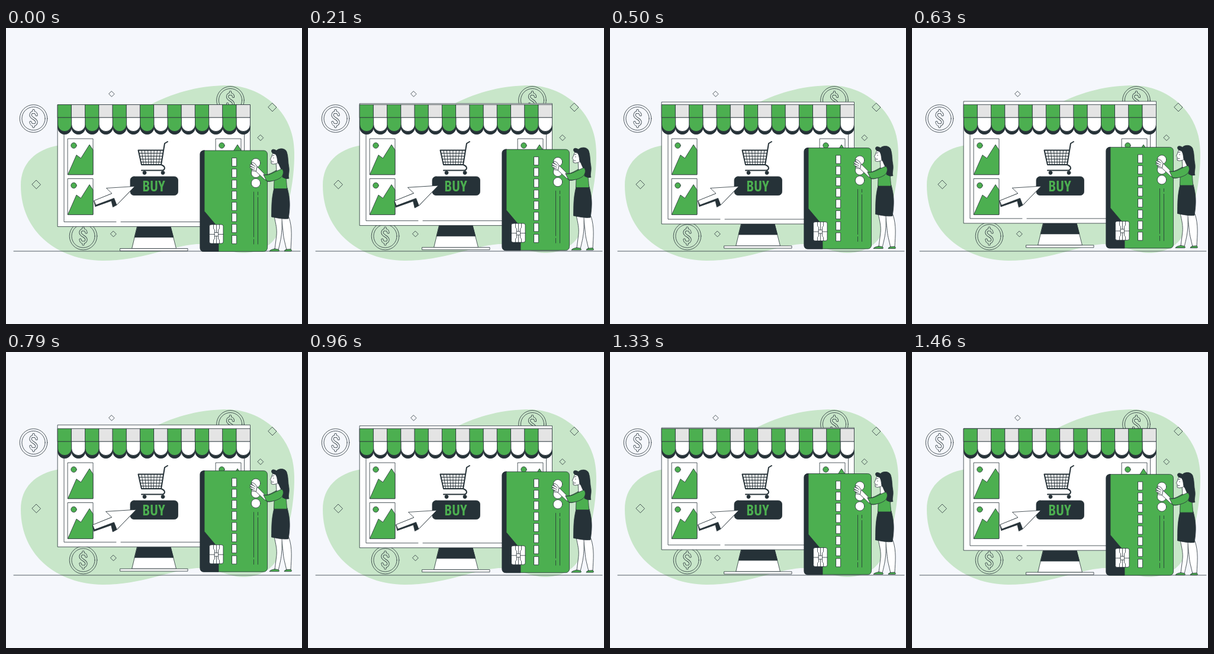
Recreate the animation shown at these times as an HTML page. Size 500x500 px, loop 1500 ms.

```html
<!DOCTYPE html>
<html lang="en">
<head>
<meta charset="utf-8">
<title>Buy online</title>
<style>
  html, body { margin: 0; height: 100%; overflow: hidden; background: #f5f7fc; }
  svg { display: block; width: 100vw; height: 100vh; stroke: #263238; stroke-width: .8; stroke-linejoin: round; stroke-linecap: round; fill: none; }
  .white { fill: #fff; }
  .green { fill: #4caf50; }
  .grey { fill: #e4e4e4; }
  .dark { fill: #263238; }
  .blob { fill: #c8e6c9; stroke: none; }
  text { font: bold 25px "Open Sans Condensed", "Roboto Condensed", "Open Sans", sans-serif; font-stretch: 75%; text-anchor: middle; fill: #4caf50; stroke: none; }
</style>
</head>
<body>
<svg viewBox="0 0 500 500">
  <path class="blob" d="M25 266C25 228 50 205 90 198C160 187 190 158 245 129C290 106 332 97 375 97C430 98 487 140 487 210C488 260 474 318 460 346C449 370 425 380 400 380C372 379 352 364 322 365C275 369 230 393 163 393C88 392 25 345 25 266Z"/>
  <g id="diamonds"></g>
  <g id="coins"></g>
  <path d="M13 377H497"/>

  <g class="float">
    <path class="white" d="M222 335.5H278L287.5 372.5H213Z"/>
    <path class="dark" d="M222 335.5H278L282.8 353.5H217.4Z"/>
    <path class="white" d="M193 372.5H307V376.5H193ZM87.5 129.5H412.5V335.5H87.5Z"/>
    <path d="M98 150V327.5H186M194 327.5H402.5V150"/>
  </g>

  <g id="pictures"></g>
  <g id="awning"></g>

  <g id="cart">
    <path stroke-width="2" d="M273 192L268 195L262 231H229L223.5 206.5H266M262 231C265 232 268 234 268 237Q267 240.500 264 240.500H229"/>
    <path id="mesh" stroke-width="1"/>
    <circle class="dark" cx="234" cy="244.500" r="3"/>
    <circle class="dark" cx="265" cy="244.500" r="3"/>
  </g>

  <rect class="dark" x="210" y="251" width="80.500" height="31.500" rx="6"/>
  <text x="249.500" y="276">BUY</text>

  <g id="cursor">
    <path class="dark" d="M149 292L179 279.500L217.500 267.500L187 299L180.500 302.500L178 292L151 301.500Z"/>
    <path class="white" d="M149 291.500L179 279.500L169.500 270.500L217.500 267.500L187 299L182.500 287.500L152 299Z"/>
  </g>

  <g class="float">
    <rect class="green" x="328" y="207" width="113.500" height="170.500" rx="6"/>
    <path class="dark" d="M335 207V309.500L359 338V377.500H334Q328 377.500 328 371.500V213Q328 207 335 207Z"/>
    <g id="dashes" class="white"></g>
    <rect class="white" x="343.500" y="332" width="23.500" height="32" rx="3"/>
    <path d="M352.500 345.500H358.500V351.500H352.500ZM343.500 348.500H352.500M358.500 348.500H367M355.500 332V345.500M355.500 351.500V364M350.500 332V339L352.500 341V345.500M360.500 332V339L358.500 341V345.500M350.500 364V358L352.500 356V351.500M360.500 364V358L358.500 356V351.500"/>
    <g id="dots" class="white"></g>
    <path d="M418.500 277V353M418.500 357V365M425.500 277V282M425.500 286V365"/>

    <g id="woman">
      <path class="white" d="M465 320C468 338 468 350 470 358L474 375L481 374C482 355 484 338 478 320Z"/>
      <path class="white" d="M453 318C456 332 458 340 457 350L454 374L460 375C464 358 467 348 466 321Z"/>
      <path class="green" d="M454 373L460 374Q463 377 460 377H445Q446 374.500 454 373ZM474 374L481 373.500Q484 377 481 377H470Q470 375 474 374Z"/>
      <path class="dark" d="M453 270H475C479 285 481 298 477 322C468 323 458 321 448.500 319C449 302 448 290 453 270Z"/>
      <path class="white" d="M456 226L457 241Q462 244 467 239L465 222Z"/>
      <path class="green" d="M456 241Q462 245 468 238C474 241 473 260 475 271.500H452.500L453 257C446 260 442 260 440 258L434 248C444 249 449 244 456 241Z"/>
      <path class="white" d="M424 234L436 246Q439 249 440 257L437 256L422 242Z"/>
      <path class="white" d="M424 234Q421 228 417 227Q414 226 415 229L418 232L413 230Q411 231 413 233L416 235L412 234Q411 236 414 237L417 239L414 239Q415 242 422 242Z"/>
      <path d="M418 232L421 234M416 235L420 237M417 239L420 240M435 247Q440 252 440 258"/>
      <path class="white" d="M452 210C449 214 449 217 446.500 222L448 223.500L448 229Q451 231 457 229L464 223V210Z"/>
      <path class="dark" d="M457 207C460 203 471 202 474 209C477 217 476 226 478 236C479 244 476 250 478 254Q473 256 467 252C469 245 464 238 461 230C457 227 460 219 455 213Q448 212 448.500 207Q450 203 457 207Z"/>
      <path d="M450 216L453 215M452 219V220M449 226H452"/>
      <path class="green" d="M466 238C471 242 468 251 462 254C455 258 445 260 440 258L435 248C446 250 454 242 466 238Z"/>
    </g>
  </g>
</svg>
<script>
const $ = id => document.getElementById(id);
const fill = (id, items, draw) => { $(id).innerHTML = items.map(draw).join(''); };
const range = n => [...Array(n).keys()];

fill('diamonds', [[178.5, 111.5, 4.6], [450, 134, 7], [430, 185.5, 4.8], [51.3, 264.5, 7.2], [181.5, 348, 4.8]],
  ([x, y, r]) => `<path d="M${x} ${y - r}l${r} ${r}l${-r} ${r}l${-r} ${-r}z"/>`);

// A wide dark stroke under a narrower light one gives an outlined dollar sign.
const dollar = 'M5-6C4-13-5-12-5-6C-5 0 5 0 5 6C5 12-4 13-5 6M0-10V-14M0 10V14';
fill('coins', [[46.5, 153, '#f5f7fc'], [130.5, 351.5, '#c8e6c9'], [379, 122, '#c8e6c9']],
  ([x, y, inside]) => `<g transform="translate(${x} ${y})"><circle r="23.3"/><circle r="19.6"/>
    <path d="${dollar}" stroke-width="4.200"/><path d="${dollar}" stroke="${inside}" stroke-width="2.600"/></g>`);

fill('pictures', [[104.5, 187], [104.5, 254.5], [354.5, 187]],
  ([x, y]) => `<g transform="translate(${x} ${y})"><path class="white" d="M0 0H42.500V60.500H0Z"/>
    <circle class="green" cx="10" cy="11.500" r="4.700"/>
    <path class="green" d="M0 60.500L14.500 27.500L22 33L36.500 10L42.500 19V60.500Z"/></g>`);

const stripe = 325 / 14;
const scallop = (i, y, cls) =>
  `<path class="${cls}" d="M${87.5 + i * stripe} ${y}v11.500a${stripe / 2} 11.600 0 0 0 ${stripe} 0v-11.500z"/>`;
$('awning').innerHTML = range(14).map(i => scallop(i, 156.5, 'dark')).join('') + range(14).map(i =>
  `<rect class="${i % 2 ? 'grey' : 'green'}" x="${87.5 + i * stripe}" y="129.500" width="${stripe}" height="22"/>`
  + scallop(i, 151.5, i % 2 ? 'white' : 'green')).join('');

$('mesh').setAttribute('d',
  range(7).map(i => `M${229 + i * 5.3} 206.500L${232.5 + i * 4.2} 231`).join('')
  + range(4).map(i => `M${224.5 + i * 1.1} ${211.5 + i * 5}H${265.5 - i * .8}`).join(''));

fill('dashes', range(8), i => `<rect x="382" y="${219.5 + i * 18.7}" width="7.500" height="14"/>`);
fill('dots', range(3), i => `<circle cx="422" cy="${228 + i * 17}" r="7.700"/>`);

const PERIOD = 1500;
const beats = [[0, 1], [.1, 1.1], [.3, 1], [.4, 1], [.5, 1.1], [.6, 1], [1, 1]];
function beat(p) {
  const i = beats.findIndex(([end]) => end > p);
  const [t0, s0] = beats[i - 1], [t1, s1] = beats[i];
  return s0 + (s1 - s0) * (p - t0) / (t1 - t0);
}

const floats = document.querySelectorAll('.float');
function frame() {
  const p = performance.now() % PERIOD / PERIOD;
  const lift = 6.67 * (1 - Math.abs(1 - 2 * p));
  floats.forEach(g => g.setAttribute('transform', `translate(0 ${-lift})`));
  $('cursor').setAttribute('transform', `translate(183 285) scale(${beat(p)}) translate(-183 -285)`);
  requestAnimationFrame(frame);
}
frame();
</script>
</body>
</html>
```
